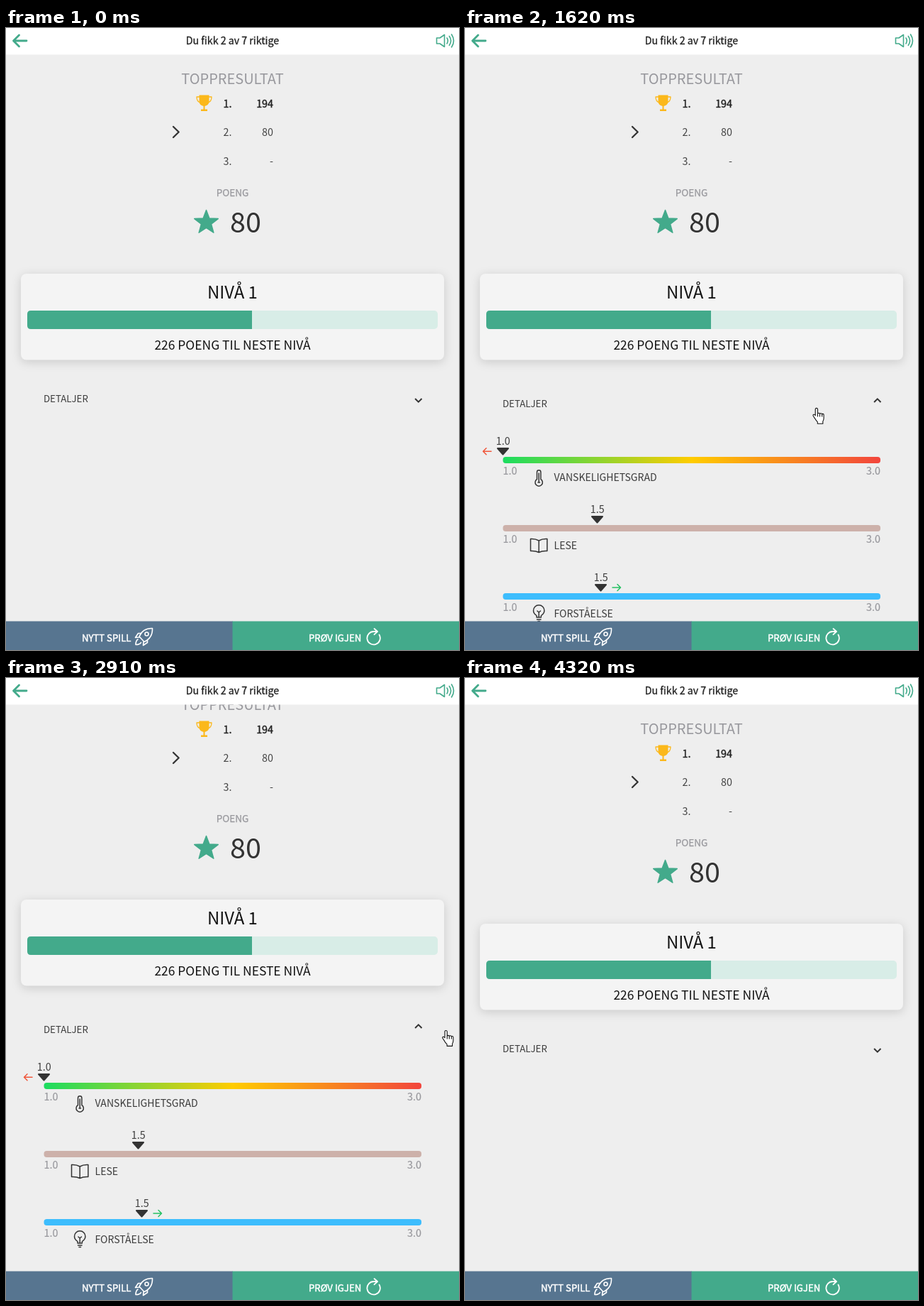
Recreate the animation shown at these times as an HTML page. Size 639 px wide and 876 px high, loop 5520 ms.

```html
<!DOCTYPE html>
<html lang="nb">
<head>
<meta charset="utf-8">
<title>Resultat</title>
<style>
html, body { margin: 0; width: 100%; height: 100%; overflow: hidden; background: #eee; }
svg { display: block; width: 100vw; height: 100vh; }
text { font-family: "Noto Sans CJK JP", "Noto Sans CJK SC", "Noto Sans CJK", "Noto Sans", sans-serif; }
.line { fill: none; stroke-linecap: round; stroke-linejoin: round; }
.card { filter: drop-shadow(0 3px 7px rgba(0, 0, 0, .15)); }
</style>
</head>
<body>
<svg id="stage" viewBox="0 0 639 876">
  <defs>
    <linearGradient id="heat">
      <stop offset="0" stop-color="#1bdc60"/>
      <stop offset=".5" stop-color="#fc0"/>
      <stop offset="1" stop-color="#f2453d"/>
    </linearGradient>
    <clipPath id="view"><rect y="37" width="639" height="799"/></clipPath>
    <clipPath id="fold"><rect id="foldBox" width="639" height="0"/></clipPath>
  </defs>
  <rect width="639" height="876" fill="#eee"/>

  <g clip-path="url(#view)">
    <g id="page">
      <g id="scores"></g>
      <g fill="#fbb81b">
        <path d="M272.500 94.500h14v8.500q0 5.500-6 7v4.500h3.500v2.500h-9v-2.500h3.500v-4.500q-6-1.500-6-7z"/>
        <path class="line" stroke="#fbb81b" stroke-width="1.300" d="M273 97h-4q0 7 5.500 8M286 97h4q0 7-5.500 8"/>
      </g>
      <path class="line" stroke="#333" stroke-width="2.300" d="M236 139l7.700 7.500-7.700 7.500"/>
      <path id="star" fill="#43aa8b" stroke="#43aa8b" stroke-width="1.500" stroke-linejoin="round"/>

      <rect class="card" x="21" y="346" width="597" height="121.500" rx="8" fill="#f4f4f4"/>
      <rect x="30" y="398" width="579" height="26" rx="5" fill="#d8ede7"/>
      <path d="M347 398H35q-5 0-5 5v16q0 5 5 5h312z" fill="#43aa8b"/>
      <g id="level"></g>

      <g id="summary"></g>
      <path id="caret" class="line" stroke="#333" stroke-width="2" style="stroke-linecap:butt;stroke-linejoin:miter" d="M-4.700 1l4.700 4.700 4.700-4.700"/>
      <g clip-path="url(#fold)"><g id="details"></g></g>
    </g>
  </g>

  <rect width="639" height="37.500" fill="#fff"/>
  <g class="line" stroke="#43aa8b">
    <path stroke-width="2.800" d="M29 18H11M18.500 10l-8 8 8 8"/>
    <path stroke-width="1.600" d="M607.500 14h4.500l6.500-4.500v17l-6.500-4.500h-4.500zM622 14q2.600 4 0 8M625.300 11.500q4.600 6.500 0 13M628.500 9q6 9 0 18"/>
  </g>
  <rect y="835.500" width="320" height="40.500" fill="#577590"/>
  <rect x="319.500" y="835.500" width="319.500" height="40.500" fill="#43aa8b"/>
  <g class="line" stroke="#fff" stroke-width="1.600">
    <path d="M188 857q5-12 18.500-11.500Q207 859 195 864.500zM191 852.500h-4.500l-4 6 5.500-.500M199.500 861.500v4l-6 4 .500-5M186 861q-3 2-3 7.500 5.500 0 7.500-3"/>
    <circle cx="198.500" cy="853.500" r="2.500"/>
    <path stroke-width="1.800" d="M526.500 854.500a9.200 9.200 0 1 1-7.500-4.500h4M519.500 846l4.500 4-4.500 4.200"/>
  </g>
  <g id="bars"></g>

  <g id="cursor" fill="#fff" stroke="#111" stroke-linejoin="round">
    <path id="hand" stroke-width="1.100" d="M-1.800 1q0-1.600 1.600-1.600T1.500 1v6.500q0-1.200 1.500-1.200t1.500 1.400q.200-1 1.600-1t1.500 1.500q.200-.800 1.300-.800t1.200 1.500v4.600q0 2.500-1.300 4.500v3.300h-7.500v-2.500q-2.200-2-3.600-4.700L-4.700 10.500q-.800-1.700.500-2.200t2.400 1.500zM1.500 7.500v4M4.500 8v3.500M7.600 8.500v3"/>
    <path id="arrow" d="M0 0v16l3.700-3.500 2.500 6 2.600-1.100-2.500-5.900h5.200z"/>
  </g>
</svg>
<script>
const LOOP = 5520;
const $ = id => document.getElementById(id);

function make(parent, tag, attrs, content) {
  const el = document.createElementNS($('stage').namespaceURI, tag);
  for (const key in attrs) el.setAttribute(key, attrs[key]);
  if (content) el.textContent = content;
  parent.appendChild(el);
  return el;
}

// bold is an outline width, for weights between regular and bold
function label(parent, content, x, y, size, anchor = 'start', fill = '#3c3c3c', bold = 0) {
  make(parent, 'text', {
    x, y, fill, 'font-size': size, 'text-anchor': anchor, stroke: fill, 'stroke-width': bold
  }, content);
}

function icon(parent, d, stroke = '#333', width = 1.5) {
  make(parent, 'path', { class: 'line', d, stroke, 'stroke-width': width });
}

function buildText() {
  const scores = $('scores'), level = $('level'), bars = $('bars');
  label(bars, 'Du fikk 2 av 7 riktige', 319.5, 23.3, 14.2, 'middle', '#222', .3);
  label(bars, 'NYTT SPILL', 107, 863.5, 13.2, 'start', '#fff', .5);
  label(bars, 'PRØV IGJEN', 427, 863.5, 13.2, 'start', '#fff', .5);

  label(scores, 'TOPPRESULTAT', 319.5, 79.3, 20, 'middle', '#98989d');
  ['194', '80', '-'].forEach((points, i) => {
    const y = 111.5 + i * 40.5, look = i ? ['#444', 0] : ['#222', .4];
    label(scores, i + 1 + '.', 318.5, y, 14.33, 'end', ...look);
    label(scores, points, 377, y, 14.33, 'end', ...look);
  });
  label(scores, 'POENG', 319.5, 236.6, 13.5, 'middle', '#98989d', .25);
  label(scores, '80', 338, 288.2, 39.5, 'middle', '#333');

  label(level, 'NIVÅ 1', 319.5, 381, 23.9, 'middle', '#111');
  label(level, '226 POENG TIL NESTE NIVÅ', 319.5, 453, 17.45, 'middle', '#111');
  label($('summary'), 'DETALJER', 53, 526.5, 13.25);
}

function buildStar() {
  const points = Array.from({ length: 10 }, (_, i) => {
    const r = i % 2 ? 7.4 : 17.6, a = i * Math.PI / 5;
    return [282.5 + r * Math.sin(a), 274 - r * Math.cos(a)];
  });
  $('star').setAttribute('d', 'M' + points.join('L') + 'z');
}

function buildDetails() {
  const rows = [
    ['VANSKELIGHETSGRAD', 'url(#heat)', 53.5, '1.0',
      'M101.500 635.500v-10a2.700 2.700 0 0 1 5.400 0v10a5.200 5.200 0 1 1-5.400 0zM104.200 627v13M103 640h2.500'],
    ['LESE', '#cdb1aa', 186.5, '1.5',
      'M104.200 626q-5-3-11.700-2.500v17q6.700-.500 11.700 2 5-2.500 11.700-2v-17q-6.700-.500-11.700 2.500zv16.500'],
    ['FORSTÅELSE', '#3dbdfd', 191.5, '1.5',
      'M101 638v-2.500q-4.500-3-4.500-7a7.700 7.700 0 0 1 15.400 0q0 4-4.500 7v2.500zM101.500 641h5.500M103 643.500h2.500M102 629l2.200 2 2.200-2M104.200 631v6.500']
  ];
  rows.forEach(([name, fill, x, value, drawing], i) => {
    const g = make($('details'), 'g', { transform: `translate(0 ${i * 96})` });
    label(g, value, x + .3, 587.3, 14.33, 'middle');
    make(g, 'path', {
      d: `M${x - 7.5} 592h15l-7.500 8.500z`, fill: '#333', stroke: '#333', 'stroke-width': 2, 'stroke-linejoin': 'round'
    });
    make(g, 'rect', { x: 53.5, y: 604, width: 532.5, height: 9, rx: 4, fill });
    label(g, '1.0', 53.5, 628.5, 14.33, 'start', '#98989d', .2);
    label(g, '3.0', 586, 628.5, 14.33, 'end', '#98989d', .2);
    icon(g, drawing);
    label(g, name, 125.5, 638.3, 14.05);
  });
  icon($('details'), 'M37 596.300H25.500M30 591.800l-4.500 4.500 4.500 4.500', '#f0563a');
  icon($('details'), 'M208 788h11.500M215 783.500l4.500 4.500-4.500 4.500', '#27c163');
}

const clamp = v => Math.min(1, Math.max(0, v));
const span = (t, start, length) => clamp((t - start) / length);
const smooth = p => p * p * (3 - 2 * p);

// cubic-bezier(.4, 0, .2, 1)
function standard(x) {
  let lo = 0, hi = 1;
  for (let i = 0; i < 20; i++) {
    const s = (lo + hi) / 2;
    const bx = 1.2 * s * (1 - s) * (1 - s) + .6 * s * s * (1 - s) + s * s * s;
    if (bx < x) lo = s; else hi = s;
  }
  return lo * lo * (3 - 2 * lo);
}

// time, x, y of the pointer tip
const path = [
  [2510, 496, 536], [2650, 515, 526], [2790, 583, 503], [2900, 621, 497], [3060, 604, 500],
  [3250, 588, 497], [3480, 583, 499], [3660, 566, 532], [3800, 570, 527], [4030, 573, 521],
  [4130, 588, 544], [4290, 613, 582]
];

function pointer(t) {
  if (t < 2510) {
    const p = 1 - Math.pow(1 - span(t, 585, 555), 2.5);
    return [606 - 110 * p, 598 - 62 * p];
  }
  let i = 1;
  while (i < path.length - 1 && path[i][0] < t) i++;
  const a = path[i - 1], b = path[i], p = smooth(span(t, a[0], b[0] - a[0]));
  return [a[1] + (b[1] - a[1]) * p, a[2] + (b[2] - a[2]) * p];
}

function draw(t) {
  const open = standard(span(t, 1270, 340)) - standard(span(t, 4010, 310));
  const scroll = 34 * (smooth(span(t, 2050, 170)) - smooth(span(t, 3460, 195)));
  const shift = 7 * open;

  // whole pixels, as a scrolled page moves
  $('page').setAttribute('transform', `translate(0 ${-Math.round(scroll)})`);
  $('summary').setAttribute('transform', `translate(0 ${shift})`);
  $('caret').setAttribute('transform', `translate(581.800 ${521 + shift}) rotate(${180 * open})`);
  $('details').setAttribute('transform', `translate(0 ${14 * (open - 1)})`);
  $('foldBox').setAttribute('y', 546 + 14 * open);
  $('foldBox').setAttribute('height', 305 * open);

  const [x, y] = pointer(t);
  const overSummary = y < 547;
  $('cursor').setAttribute('transform', `translate(${x} ${y})`);
  $('cursor').setAttribute('visibility', t >= 590 && t < 4320 ? 'visible' : 'hidden');
  $('hand').style.display = overSummary ? '' : 'none';
  $('arrow').style.display = overSummary ? 'none' : '';
}

buildText();
buildStar();
buildDetails();
const begin = performance.now();
function tick() {
  draw((performance.now() - begin) % LOOP);
  requestAnimationFrame(tick);
}
draw(0);
requestAnimationFrame(tick);
</script>
</body>
</html>
```
